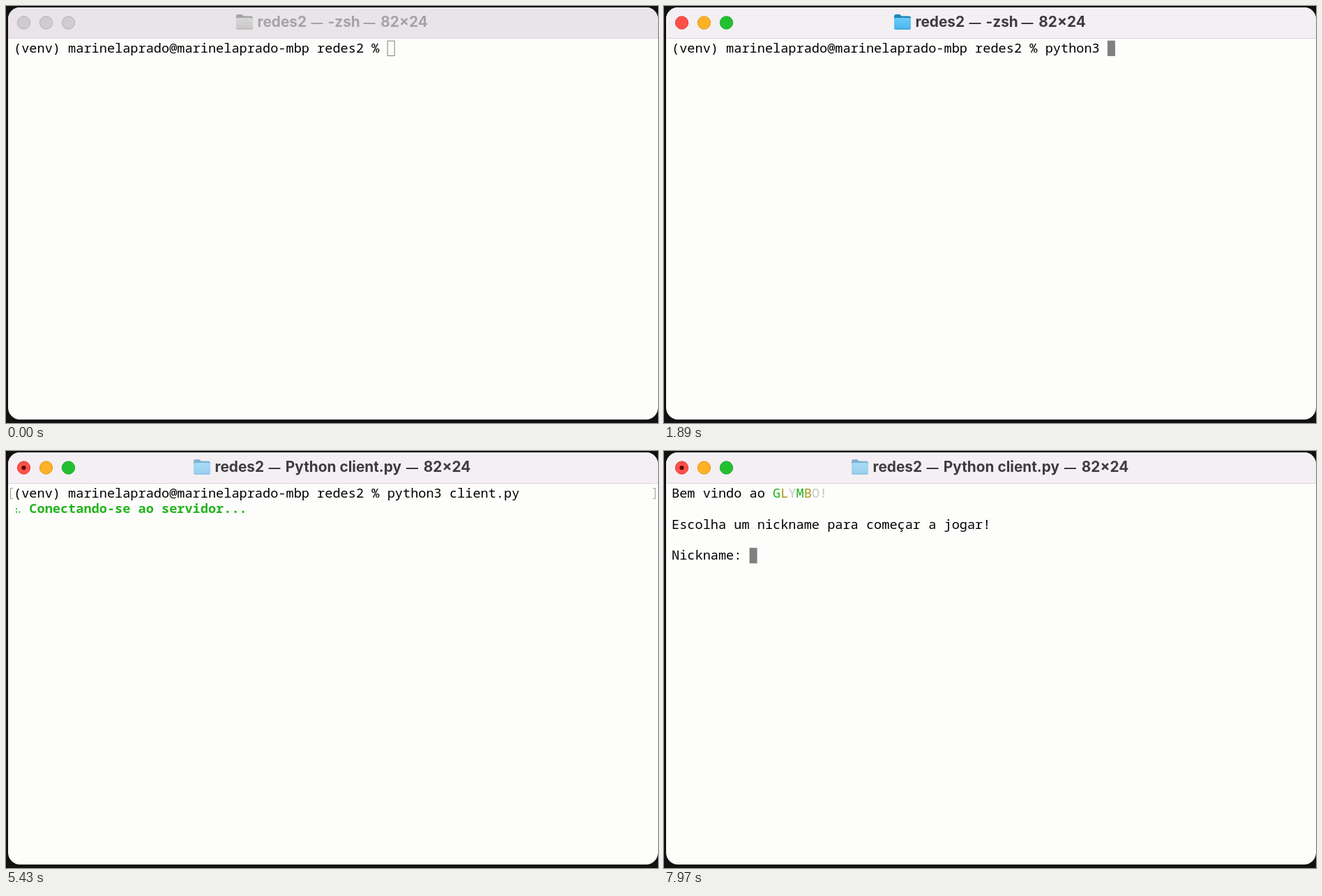
An HTML page that plays this animation: 935x599 px, repeating every 7.99 s.

```html
<!DOCTYPE html>
<html lang="pt">
<head>
<meta charset="utf-8">
<title>Terminal</title>
<style>
  html, body { margin: 0; width: 100%; height: 100%; overflow: hidden; background: #111; }
  svg { display: block; width: 935px; height: 599px; }
  text { white-space: pre; }
  #term text { font: 500 18.6px "Noto Sans Mono", "DejaVu Sans Mono", monospace; fill: #000; }
  #term .bold { font-weight: 700; }
  #term .green { fill: #22b31c; }
  #term .olive { fill: #a39a1a; }
  #term .pale { fill: #c6c6c6; }
  #term .cyan { fill: #a9dbe1; }
  #term .dim { fill: #9b9b97; }
  .title text { font: 700 20.8px Inter, "Open Sans", sans-serif; fill: #3e3b3f; }
  .title .dash { font-size: 17px; }
  .bar { fill: #f4eff3; }
  .inactive .bar { fill: #e9e4e8; }
  .inactive .title text { fill: #a7a2a6; }
  .inactive .light { fill: #cfcbd1; stroke: #b5b1b8; }
  .inactive .folder { filter: grayscale(1) brightness(1.12); opacity: .65; }
  .faded { opacity: .55; }
  .hide { display: none; }
</style>
</head>
<body>
<svg id="stage" viewBox="0 0 935 599">
  <defs>
    <linearGradient id="blue" x2="0" y2="1">
      <stop stop-color="#6acbf8"/><stop offset="1" stop-color="#4db5ec"/>
    </linearGradient>
    <linearGradient id="leaf" x2="0" y2="1">
      <stop stop-color="#2fcf3c"/><stop offset="1" stop-color="#06b01c"/>
    </linearGradient>
    <clipPath id="frame"><rect x="3" y="2" width="932" height="592" rx="17"/></clipPath>
    <g id="folder">
      <path d="M0 3q0-3 3-3h5l3 2.5h10q3 0 3 3V19H0z" fill="#2385b8"/>
      <rect y="5" width="24" height="17" rx="2.5" fill="url(#blue)"/>
      <path d="M1 20.8H23" stroke="#399dd0"/>
    </g>
  </defs>
  <rect width="935" height="599" fill="#111"/>
  <g clip-path="url(#frame)">
    <rect width="935" height="599" fill="#fdfdfb"/>
    <rect class="bar" width="935" height="46.5"/>
    <path d="M0 46.5H935" stroke="#d9d4e6"/>
  </g>
  <g stroke-width="1">
    <circle class="light" cx="25.5" cy="24" r="9.2" fill="#fe5048" stroke="#e2433d"/>
    <circle class="light" cx="57.5" cy="24" r="9.2" fill="#feb125" stroke="#e09c20"/>
    <circle class="light" cx="89.5" cy="24" r="9.2" fill="#22c031" stroke="#1dac2a"/>
    <circle id="busy" cx="25.5" cy="24" r="3.1" fill="#5c0906"/>
  </g>
  <g id="shellTitle" class="title">
    <use class="folder" href="#folder" x="330" y="12"/>
    <text y="30"><tspan x="360.5">redes2</tspan><tspan class="dash" x="437.5">—</tspan><tspan x="461.5">-zsh</tspan><tspan class="dash" x="512.5">—</tspan><tspan x="537.3">82×24</tspan></text>
  </g>
  <g id="pythonTitle" class="title">
    <use class="folder faded" href="#folder" x="269" y="12"/>
    <text y="30"><tspan x="299.5">redes2</tspan><tspan class="dash" x="376.5">—</tspan><tspan x="400.8">Python client.py</tspan><tspan class="dash" x="574">—</tspan><tspan x="598.8">82×24</tspan></text>
  </g>
  <g id="term">
    <rect id="cursor" width="11" height="22.3"/>
    <g id="prompt"></g>
    <path id="marks" d="M10 53.5H6.5V68.5H10M927.5 53.5H931V68.5H927.5" fill="none" stroke="#a2a2a0" stroke-width="1.2"/>
    <g id="connecting"><g id="spinner" class="green"></g></g>
    <g id="connected">
      <rect x="548.5" y="72.2" width="22.6" height="21.6" rx="4.5" fill="url(#leaf)" stroke="#0a8420" stroke-width="1.5"/>
      <path d="M553.5 83.5L558 89L566 76" fill="none" stroke="#fff" stroke-width="3" stroke-linecap="round" stroke-linejoin="round"/>
    </g>
    <g id="welcome"></g>
  </g>
  <g id="mouse" fill="none" stroke-linecap="round">
    <path d="M-5-12Q0-12 0-8Q0-12 5-12M0-8V8M-5 12Q0 12 0 8Q0 12 5 12M-2.5 1H2.5" stroke="#fff" stroke-width="4"/>
    <path d="M-5-12Q0-12 0-8Q0-12 5-12M0-8V8M-5 12Q0 12 0 8Q0 12 5 12M-2.5 1H2.5" stroke="#111" stroke-width="2"/>
  </g>
</svg>
<script>
const LOOP = 7990, CELL = 11.16, ROW = 22.35, LEFT = 11, TOP = 49.7;
const COMMAND = "python3 client.py", PROMPT = "(venv) marinelaprado@marinelaprado-mbp redes2 % ";
const SPINNER = "⠋⠙⠹⠸⠼⠴⠦⠧⠇⠏";
// Moments of the session, in ms.
const AT = { enter: 250, focus: 700, type: 1300, key: 80, run: 3400, connect: 4910, connected: 5910, welcome: 6910 };

const $ = id => document.getElementById(id);
const make = (tag, parent, attrs) => {
  const node = document.createElementNS("http://www.w3.org/2000/svg", tag);
  for (const name in attrs) node.setAttribute(name, attrs[name]);
  return parent.appendChild(node);
};
const write = (parent, row, col, string, style = "") => {
  const node = make("text", parent, { x: LEFT + col * CELL, y: TOP + row * ROW + 17.3, class: style });
  node.textContent = string;
  return node;
};
const show = (id, on) => $(id).classList.toggle("hide", !on);

write($("prompt"), 0, 0, PROMPT);
const typed = write($("prompt"), 0, PROMPT.length, "");

write($("connecting"), 1, 2, "Conectando-se ao servidor...", "bold green");
const dots = Array.from({ length: 6 }, (_, i) =>
  make("circle", $("spinner"), { cx: i < 3 ? 15 : 19.3, cy: 78.5 + (i % 3) * 4.6, r: 1.1 }));

write($("connected"), 1, 0, "[14:45:28]", "cyan");
write($("connected"), 1, 11, "Conexão estabelecida com o servidor!", "bold green");
write($("connected"), 1, 69, "client.py:112", "dim");

write($("welcome"), 0, 0, "Bem vindo ao ");
[..."GLYMBO!"].forEach((letter, i) =>
  write($("welcome"), 0, 13 + i, letter, i > 5 ? "pale" : ["green", "olive", "pale"][i % 3]));
write($("welcome"), 2, 0, "Escolha um nickname para começar a jogar!");
write($("welcome"), 4, 0, "Nickname: ");

function cursorCell(t, count) {
  if (t >= AT.welcome) return [4, 10];
  if (t >= AT.connected) return [2, 0];
  if (t >= AT.run) return [1, 0];
  return [0, PROMPT.length + count];
}

function drawCursor(t, count) {
  const [row, col] = cursorCell(t, count);
  const hollow = t < AT.focus, inset = hollow ? 0.5 : 0;
  const attrs = {
    x: LEFT + col * CELL + inset, y: TOP + row * ROW + inset,
    width: 11 - 2 * inset, height: 22.3 - 2 * inset,
    fill: hollow ? "none" : "#808080", stroke: hollow ? "#808080" : "none"
  };
  for (const name in attrs) $("cursor").setAttribute(name, attrs[name]);
  show("cursor", t < AT.connect || t >= AT.connected);
}

function drawMouse(t) {
  const p = Math.min(1, Math.max(0, (t - AT.enter) / 450));
  const left = (1 - p) ** 3;
  $("mouse").setAttribute("transform", `translate(${581.5 + 120 * left} ${77 + 540 * left})`);
  show("mouse", t >= AT.enter && t < AT.type);
}

function render(t) {
  const count = Math.min(COMMAND.length, Math.max(0, Math.floor((t - AT.type) / AT.key) + 1));
  const python = t >= AT.connect;
  $("stage").classList.toggle("inactive", t < AT.focus);
  typed.textContent = COMMAND.slice(0, count);
  show("shellTitle", !python);
  show("pythonTitle", python);
  show("busy", python);
  show("prompt", t < AT.welcome);
  show("marks", t >= AT.run && t < AT.welcome);
  show("connecting", python && t < AT.connected);
  show("connected", t >= AT.connected && t < AT.welcome);
  show("welcome", t >= AT.welcome);
  if (python) {
    const step = Math.floor((t - AT.connect) / 80) % SPINNER.length;
    const mask = SPINNER.charCodeAt(step) - 0x2800;
    dots.forEach((dot, i) => dot.setAttribute("opacity", mask >> i & 1));
  }
  drawCursor(t, count);
  drawMouse(t);
}

const start = performance.now();
function tick() {
  render((performance.now() - start) % LOOP);
  requestAnimationFrame(tick);
}
tick();
</script>
</body>
</html>
```
